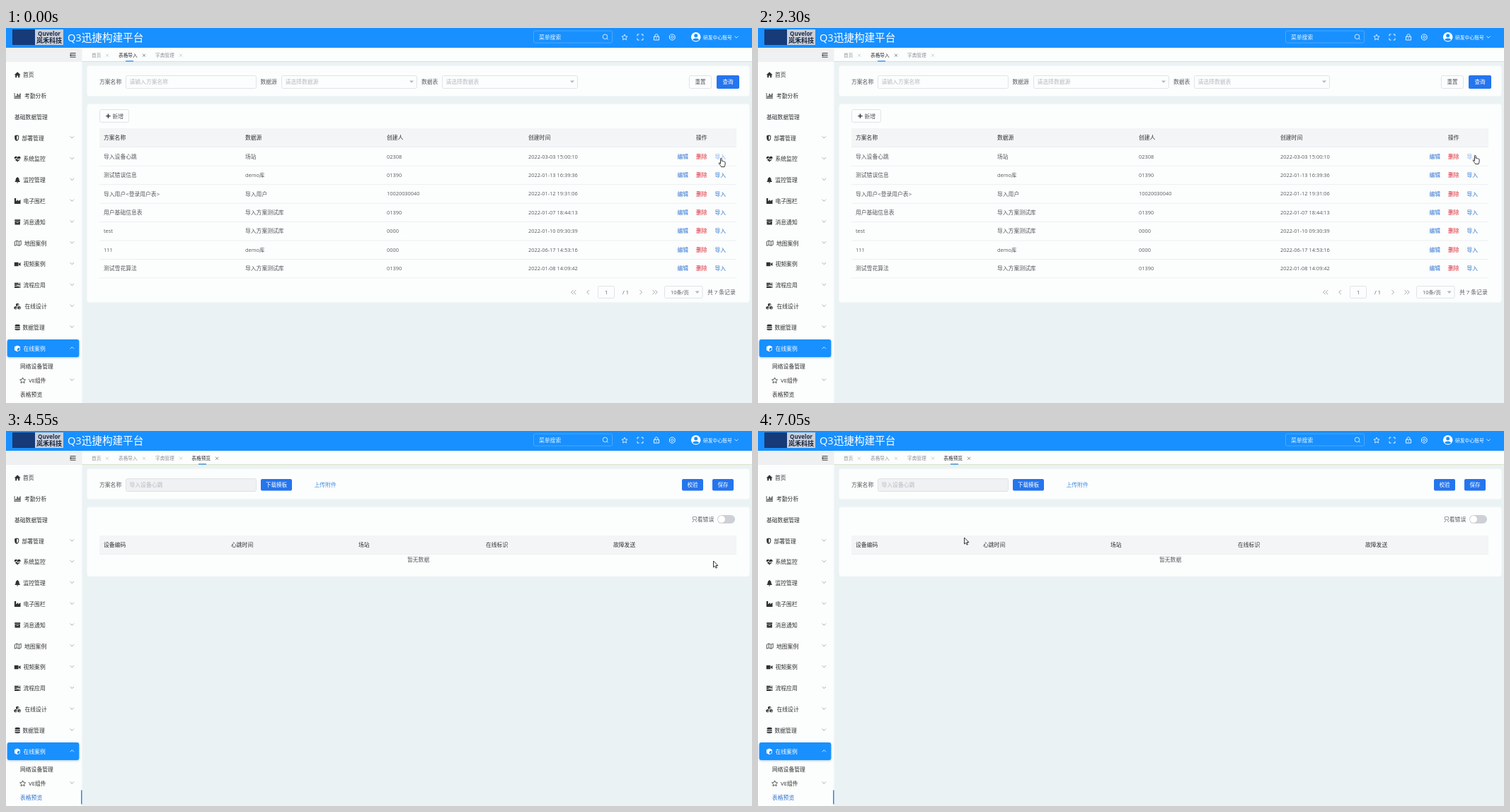
An HTML page with a canvas that plays this animation: 1054 px wide and 531 px high, repeating every 7100 ms.

```html
<!DOCTYPE html>
<html lang="zh-CN">
<head>
<meta charset="utf-8">
<title>表格导入</title>
<style>
html, body { margin: 0; width: 100%; height: 100%; overflow: hidden; background: #ebf2f3; }
canvas { display: block; width: 1054px; height: 531px; }
</style>
</head>
<body>
<canvas id="stage"></canvas>
<script>
const W = 1054, H = 531, LOOP = 7100, STEP = 50;
const PAGE_SWITCH = 3300, STATUS_END = 3700;
const FONT = '"Open Sans", "Noto Sans CJK SC", "Noto Sans CJK", sans-serif';
const BLUE = '#1890ff', BTN = '#2475ee', LINK = '#2f74d0', RED = '#dc2430';
const INK = '#303133', BODY = '#56595e', MUTE = '#909399', HINT = '#b7bac0';
const PAPER = '#fcfdfd', EDGE = '#dadde2', RULE = '#e9ecf0', HEAD = '#f4f5f6';

const cv = document.getElementById('stage');
const g = cv.getContext('2d');
const dpr = window.devicePixelRatio || 1;
cv.width = W * dpr;
cv.height = H * dpr;

function text(s, x, y, color = BODY, size = 0, weight = 400, align = 'left') {
  size = size || (/^[\u4e00-\u9fff]/.test(s) ? 7.8 : 7.4);
  g.font = `${weight} ${size}px ${FONT}`;
  g.textAlign = align;
  g.fillStyle = color;
  g.fillText(s, x, y + size * 0.37);
}

function rect(x, y, w, h, color) {
  g.fillStyle = color;
  g.fillRect(x, y, w, h);
}

function box(x, y, w, h, r, fill, edge) {
  g.beginPath();
  g.roundRect(x, y, w, h, r);
  if (fill) { g.fillStyle = fill; g.fill(); }
  if (edge) { g.strokeStyle = edge; g.lineWidth = 0.8; g.stroke(); }
}

function line(points, color, width = 0.8) {
  g.beginPath();
  points.forEach(([x, y], i) => i ? g.lineTo(x, y) : g.moveTo(x, y));
  g.strokeStyle = color;
  g.lineWidth = width;
  g.stroke();
}

function shape(d, x, y, fill, edge, width = 0.8) {
  const p = new Path2D(d);
  g.save();
  g.translate(x, y);
  if (fill) { g.fillStyle = fill; g.fill(p, 'evenodd'); }
  if (edge) { g.strokeStyle = edge; g.lineWidth = width; g.stroke(p); }
  g.restore();
}

function dot(x, y, r, fill, edge, width = 0.9) {
  g.beginPath();
  g.arc(x, y, r, 0, Math.PI * 2);
  if (fill) { g.fillStyle = fill; g.fill(); }
  if (edge) { g.strokeStyle = edge; g.lineWidth = width; g.stroke(); }
}

const chevron = (x, y, color, up = 1) =>
  line([[x - 2.6, y - 1.3 * up], [x, y + 1.3 * up], [x + 2.6, y - 1.3 * up]], color);

const angle = (x, y, dir) =>
  line([[x - 1.6 * dir, y - 3], [x + 1.6 * dir, y], [x - 1.6 * dir, y + 3]], MUTE);

const caret = (x, y) => shape('M-3 -1.6H3L0 1.8Z', x, y, '#b4b7bd');

const cross = (x, y, color) =>
  shape('M-2 -2L2 2M2 -2L-2 2', x, y, null, color, 0.7);

function button(label, x, y, w, h, plain) {
  box(x, y, w, h, 2, plain ? PAPER : BTN, plain ? EDGE : null);
  text(label, x + w / 2, y + h / 2, plain ? BODY : '#fff', 7.6, 400, 'center');
}

// Icons are drawn around their centre, about 9 px wide
const STAR = 'M0 -4L1.2 -1.3L4 -1L1.9 1L2.5 3.8L0 2.4L-2.5 3.8L-1.9 1L-4 -1L-1.2 -1.3Z';
const CUBE = 'M0 -4.4L4 -2.5V2.5L0 4.4L-4 2.5V-2.5ZM0 .2L3.2 -1.5V2L0 3.6Z';
const ICONS = {
  home: 'M0 -4L4.5 .3H3V4H1V1.2H-1V4H-3V.3H-4.5Z',
  chart: 'M-4.5 -4H-3.7V3.2H4.8V4H-4.5ZM-2.7 0H-1.4V2.4H-2.7ZM-.7 -3H.6V2.4H-.7ZM1.3 -1.5H2.6V2.4H1.3ZM3.2 -3.6H4.4V2.4H3.2Z',
  shield: 'M-4 -3.2L-1 -4.2L2 -3.2V0C2 2.2 .6 3.6 -1 4.3C-2.6 3.6 -4 2.2 -4 0ZM-1 -3V3C.3 2.2 1 1.4 1 0V-2.4Z',
  heart: 'M0 4L-3.8 .4H-1.8L-1 -1L.5 2L1.6 .4H3.8ZM-4.3 -.4C-5 -4 -1.4 -4.6 0 -2.4C1.4 -4.6 5 -4 4.3 -.4H1.2L.5 .6L-1 -2.3L-2.2 -.4Z',
  bell: 'M-.5 -4.3H.5V-3.6C2.6 -3 2.4 -.3 2.7 .8L3.8 2.6H-3.8L-2.7 .8C-2.4 -.3 -2.6 -3 -.5 -3.6ZM-1.2 3.1H1.2C1 4.6 -1 4.6 -1.2 3.1Z',
  factory: 'M-4.3 -4H-2V.2L1 -2V.2L4.3 -2V4H-4.3Z',
  archive: 'M-4 -3.6H4V-1.5H-4ZM-3.7 -1H3.7V3.7H-3.7ZM-1.5 0V.8H1.5V0Z',
  map: 'M-4.4 -2.4L-1.5 -3.6L1.5 -2.4L4.4 -3.6V2.4L1.5 3.6L-1.5 2.4L-4.4 3.6ZM-1.5 -3.6V2.4M1.5 -2.4V3.6',
  video: 'M-4.4 -2.8H1.4V2.8H-4.4ZM1.9 -1L4.3 -2.6V2.6L1.9 1Z',
  tasks: 'M-4.2 -3.6H4.2V-1.6H-4.2ZM-4.2 -1H4.2V1H-4.2ZM-4.2 1.6H4.2V3.6H-4.2ZM1 -3V-2.2H3.6V-3ZM-1 -.4V.4H3.6V-.4ZM2 2.2V3H3.6V2.2Z',
  cubes: 'M0 -4.4L2.2 -3.3V-.8L0 .2L-2.2 -.8V-3.3ZM-2.6 0L-.4 1V3.4L-2.6 4.4L-4.8 3.4V1ZM2.6 0L4.8 1V3.4L2.6 4.4L.4 3.4V1ZM0 -2L1.6 -2.8V-1.2L0 -.5ZM-2.6 2.2L-1 1.5V3L-2.6 3.7ZM2.6 2.2L4.2 1.5V3L2.6 3.7Z',
  data: 'M-3.6 -3C-3.6 -4.5 3.6 -4.5 3.6 -3V-2C3.6 -1 -3.6 -1 -3.6 -2ZM-3.6 -1C-2 0 2 0 3.6 -1V.6C2 1.6 -2 1.6 -3.6 .6ZM-3.6 1.6C-2 2.5 2 2.5 3.6 1.6V3C3.6 4.5 -3.6 4.5 -3.6 3Z'
};

const MENU = [
  ['首页', 24, 'home'], ['考勤分析', 26, 'chart'], ['基础数据管理', 12],
  ['部署管理', 22.5, 'shield'], ['系统监控', 24.5, 'heart'], ['监控管理', 24.5, 'bell'],
  ['电子围栏', 24.5, 'factory'], ['消息通知', 24.5, 'archive'], ['地图案例', 26, 'map'],
  ['视频案例', 24.5, 'video'], ['流程应用', 24.5, 'tasks'], ['在线设计', 26.5, 'cubes'],
  ['数据管理', 23.5, 'data']
];

const ROWS = [
  ['导入设备心跳', '场站', '02308', '2022-03-03 15:00:10'],
  ['测试错误信息', 'demo库', '01390', '2022-01-13 16:39:36'],
  ['导入用户<登录用户表>', '导入用户', '10020030040', '2022-01-12 19:31:06'],
  ['用户基础信息表', '导入方案测试库', '01390', '2022-01-07 18:44:13'],
  ['test', '导入方案测试库', '0000', '2022-01-10 09:30:39'],
  ['111', 'demo库', '0000', '2022-06-17 14:53:16'],
  ['测试雪花算法', '导入方案测试库', '01390', '2022-01-08 14:09:42']
];

function header() {
  rect(0, 0, W, 28, BLUE);
  rect(9, 2, 32, 22, '#173a78');
  rect(41, 2, 40, 22, '#c9cfd8');
  text('Quvelor', 61, 8, '#1b2a4c', 8, 700, 'center');
  text('岚禾科技', 61, 17.5, '#14203c', 9, 700, 'center');
  text('Q3迅捷构建平台', 87, 13.3, '#fff', 14.6);

  box(745.5, 4, 111, 17, 2, null, '#58afff');
  text('菜单搜索', 753, 13, '#e8f4ff');
  dot(846.5, 12.3, 3.3, null, '#fff', 0.8);
  line([[848.9, 14.7], [850.6, 16.4]], '#fff');

  shape(STAR, 874, 13, null, '#fff');
  shape('M-4 -1.5V-4H-1.5M1.5 -4H4V-1.5M4 1.5V4H1.5M-1.5 4H-4V1.5', 896, 13, null, '#fff', 0.9);
  shape('M-3.6 -.8H3.6V4H-3.6ZM-2 -.8V-2.4C-2 -5 2 -5 2 -2.4V-.8M0 .8V2.4', 919, 13, null, '#fff', 0.9);
  shape('M-2 -3.6L0 -4.2L2 -3.6L3.8 -2V2L2 3.6L0 4.2L-2 3.6L-3.8 2V-2Z', 941.3, 13, null, '#fff', 0.9);
  dot(941.3, 13, 1.7, null, '#fff', 0.8);

  dot(974.7, 12.8, 6.8, '#fff');
  dot(974.7, 10.8, 2.5, BLUE);
  shape('M-4.4 4C-3.6 .8 3.6 .8 4.4 4C2.4 6 -2.4 6 -4.4 4Z', 974.7, 12.8, BLUE);
  text('研发中心账号', 985, 13, '#fff', 6.8);
  chevron(1032, 12.8, '#fff');
}

function sidebar(preview) {
  rect(0, 28, 107.5, H - 28, PAPER);
  rect(0, 28, 107.5, 20, '#eef0f1');
  for (const dy of [-2.7, 0, 2.7]) rect(90.5, 37.9 + dy, 8, 1, INK);
  shape('M2 -1.6L0 0L2 1.6Z', 90, 38.4, INK);

  MENU.forEach(([label, x, icon], i) => {
    const y = 66.3 + i * 29.8;
    if (icon === 'map') shape(ICONS.map, 16.8, y, null, INK);
    else if (icon) shape(ICONS[icon], 16.2, y, INK);
    text(label, x, y, INK);
    if (i > 2) chevron(93.3, y - 1, MUTE);
  });

  g.save();
  g.shadowColor = 'rgba(24,110,200,.35)';
  g.shadowBlur = 3 * dpr;
  g.shadowOffsetY = dpr;
  box(1.7, 441, 101.6, 25, 3, BLUE);
  g.restore();
  shape(CUBE, 16, 453.8, '#fff');
  text('在线案例', 24.5, 453.7, '#fff');
  chevron(93.3, 453, '#fff', -1);

  text('网络设备管理', 20, 479, INK);
  shape(STAR, 23.6, 499, null, INK);
  text('VE组件', 32, 499, INK, 7.8);
  chevron(93.3, 498, MUTE);
  text('表格预览', 20, 518.7, preview ? LINK : INK);
  if (preview) rect(106, 508.5, 1.5, 20, '#2c86dc');
}

function tabs(preview) {
  rect(107.5, 28, W - 107.5, 19, PAPER);
  rect(107.5, 47, W - 107.5, 1, '#dbe2c6');
  const list = [['首页', 121, 143], ['表格导入', 159, 195], ['字典管理', 211, 247]];
  if (preview) list.push(['表格预览', 262.3, 298]);
  const active = preview ? 3 : 1;
  list.forEach(([label, x, cx], i) => {
    text(label, x, 38.3, i === active ? INK : MUTE, 6.7);
    cross(cx, 38.7, i === active ? BODY : HINT);
  });
  rect(preview ? 272 : 169, 46.2, 11, 1.4, '#3a94ea');
}

function field(label, lx, x, w, hint, select) {
  text(label, lx, 76.2);
  box(x + .5, 67.5, w - 1, 18, 2, PAPER, EDGE);
  text(hint, x + 5.5, 76.4, HINT);
  if (select) caret(x + w - 8, 76);
}

function tableHead(y, cols) {
  rect(132, y, 900, 26.3, HEAD);
  cols.forEach(([label, x]) => text(label, x, y + 13.4, INK, 7.8, 500));
  rect(132, y + 26, 900, 0.8, RULE);
}

function listPage() {
  box(114.5, 53.5, 936, 43, 4, PAPER);
  field('方案名称', 132, 169, 185, '请输入方案名称');
  field('数据源', 359.5, 389, 192, '请选择数据源', true);
  field('数据表', 587, 616, 192, '请选择数据表', true);
  button('重置', 965.5, 67.5, 31, 18, true);
  button('查询', 1004, 67, 32, 19);

  box(114.5, 107.5, 936, 281, 4, PAPER);
  box(132.5, 115.5, 41, 18, 2, PAPER, EDGE);
  shape('M-3.2 0H3.2M0 -3.2V3.2', 144.4, 124.6, null, INK, 1.4);
  text('新增', 150.5, 124.8);

  tableHead(142, [['方案名称', 138], ['数据源', 338], ['创建人', 538], ['创建时间', 738], ['操作', 975]]);
  ROWS.forEach((row, i) => {
    const y = 181.8 + i * 26.45;
    row.forEach((s, c) => text(s, 138 + c * 200, y));
    text('编辑', 948.5, y, LINK);
    text('删除', 975, y, RED);
    text('导入', 1001.5, y, i ? LINK : '#7fb0ee');
    rect(132, y + 13, 900, 0.8, RULE);
  });

  const y = 374.2;
  angle(800, y, -1); angle(803.7, y, -1);
  angle(822.3, y, -1);
  box(836.5, 365.5, 23, 17, 2, PAPER, EDGE);
  text('1', 848.2, y, BODY, 0, 400, 'center');
  text('/ 1', 871, y);
  angle(897, y, 1);
  angle(915, y, 1); angle(918.7, y, 1);
  box(930.5, 365.5, 53.5, 17, 2, PAPER, EDGE);
  text('10条/页', 939, y);
  caret(976.7, y);
  text('共 7 条记录', 991, y - .3);
}

function previewPage() {
  box(114.5, 53.5, 936, 43, 4, PAPER);
  text('方案名称', 132, 76.2);
  box(169.5, 67.5, 184, 18, 2, '#f0f1f2', EDGE);
  text('导入设备心跳', 174.5, 76.4, HINT);
  button('下载模板', 360, 68, 44, 16.5);
  text('上传附件', 435.5, 76.2, '#3f8fe6');
  button('校验', 955, 68, 30, 16.5);
  button('保存', 998, 68, 30, 16.5);

  box(114.5, 107.5, 936, 98.5, 4, PAPER);
  text('只看错误', 969, 124.8);
  box(1005, 119, 25, 12, 6, '#cdd0d4');
  dot(1011, 125, 5, '#fff');
  const cols = ['设备编码', '心跳时间', '场站', '在线标识', '故障发送'];
  tableHead(148, cols.map((s, i) => [s, 138 + i * 180]));
  text('暂无数据', 582.6, 181.7, BODY, 0, 400, 'center');
}

function statusBar() {
  box(-4, 525, 354, 12, 2, '#56595c');
  text('正在连接...', 1, 530, '#a9dce0', 7);
}

// Pointer tip: time, x, y
const PATH = [
  [0, 1009, 184], [50, 1009, 184], [600, 1018, 175], [1000, 1018, 175],
  [1500, 1016, 177], [2200, 1012, 180], [4350, 1012, 180], [4500, 1008, 182],
  [4550, 999, 184], [4950, 875, 216], [5200, 755, 224], [5600, 570, 207],
  [5950, 472, 178], [6000, 462, 168], [6400, 382, 148], [6750, 318, 146],
  [7050, 291, 151], [7100, 291, 151]
];

function pointer(t) {
  const i = PATH.findIndex(k => k[0] > t);
  const a = PATH[i - 1], b = PATH[i];
  const u = (t - a[0]) / (b[0] - a[0]);
  return [1, 2].map(k => Math.round(a[k] + (b[k] - a[k]) * u));
}

const ARROW = 'M0 0V9L2.1 7.1L3.5 10.2L5 9.5L3.6 6.5H6.4Z';
const HAND = 'M0 6V1.2C0 .2 1.8 .2 1.8 1.2V4.6C2.2 4 3.4 4.2 3.5 5C4 4.4 5 4.6 5.2 5.4C5.8 5 6.6 5.4 6.6 6.2V9C6.6 10.5 5.8 11 5.6 12.6H1C.8 11.2 -1 9.8 -2.1 7.8C-2.6 6.9 -1.4 6.4 -.8 7.2L0 8.2Z';

function draw(t) {
  const preview = t >= PAGE_SWITCH;
  g.setTransform(dpr, 0, 0, dpr, 0, 0);
  rect(0, 0, W, H, '#ebf2f3');
  header();
  sidebar(preview);
  tabs(preview);
  preview ? previewPage() : listPage();
  if (preview && t < STATUS_END) statusBar();
  const [x, y] = pointer(t);
  shape(preview ? ARROW : HAND, x + .5, y, '#fff', '#222', 0.9);
}

function tick() {
  const t = performance.now() % LOOP;
  draw(Math.floor(t / STEP) * STEP);
  requestAnimationFrame(tick);
}
tick();
</script>
</body>
</html>
```
